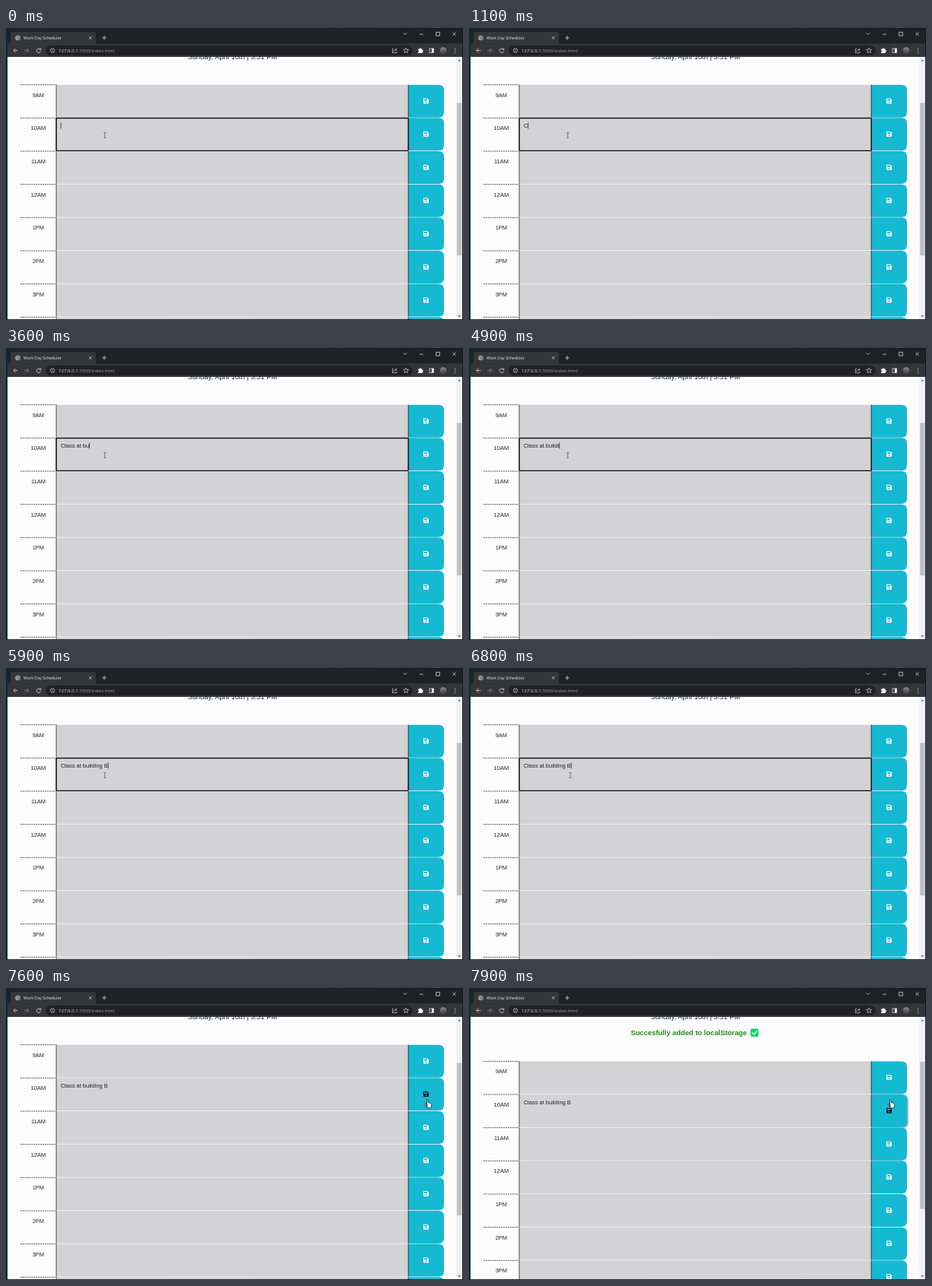
An HTML page that plays this animation: 600 by 384 pixels, repeating every 8 s.

```html
<!DOCTYPE html>
<html lang="en">
<head>
<meta charset="utf-8">
<title>Work Day Scheduler</title>
<style>
  html, body { margin: 0; width: 100%; height: 100%; overflow: hidden; background: #202124; }
  svg { display: block; width: 600px; height: 384px; }
  text { font-family: "Liberation Sans", Arial, sans-serif; font-size: 7.5px; fill: #212529; white-space: pre; }
  .ui { font-family: "Open Sans", "Noto Sans", sans-serif; }
  .line { fill: none; stroke: #d5d7da; stroke-width: .8; }
  .dim { stroke: #85888c; }
</style>
</head>
<body>
<svg viewBox="0 0 600 384">
  <defs>
    <linearGradient id="desk">
      <stop offset="0" stop-color="#0b2a3a"/><stop offset=".5" stop-color="#12202c"/><stop offset="1" stop-color="#0a1b28"/>
    </linearGradient>
    <linearGradient id="face" x2="0" y2="1">
      <stop offset="0" stop-color="#8b8790"/><stop offset="1" stop-color="#3f3c42"/>
    </linearGradient>
    <clipPath id="view"><rect x="2" y="38" width="597" height="345"/></clipPath>
    <filter id="soft" x="-20%" y="-20%" width="140%" height="140%"><feGaussianBlur stdDeviation="1"/></filter>
  </defs>

  <rect width="600" height="384" fill="url(#desk)"/>
  <rect x="2" y="1" width="597" height="20" fill="#202124"/>
  <path d="M3 21q3 0 3-3V8q0-3 3-3h106q3 0 3 3v10q0 3 3 3z" fill="#35363a"/>
  <rect x="2" y="20.5" width="597" height="17.5" fill="#35363a"/>
  <rect x="52" y="23" width="482" height="13" rx="6.5" fill="#202124"/>

  <!-- tab strip -->
  <circle cx="15.5" cy="13" r="3.3" fill="#a5a8ad"/>
  <path d="M13.4 11.4l1.6 1.2-.4 1.8M16 10.4l.6 1.4 1.4.5M16.3 15.4l.6-1.4 1.2-.2" class="line" style="stroke:#35363a"/>
  <text x="23" y="14.9" class="ui" style="font-size:5.3px;fill:#e8eaed">Work Day Scheduler</text>
  <path d="M109 11.3l3.4 3.4m0-3.4l-3.4 3.4M126.2 13h5.6M129 10.2v5.6" class="line"/>
  <path d="M521.8 6.4l2.2 2.2 2.2-2.2M543 8.2h4.6M564.7 5.6h4.6v4.6h-4.6zM586.2 5.6l4.6 4.6m0-4.6l-4.6 4.6" class="line"/>

  <!-- toolbar -->
  <path d="M15.6 29.6H9.8m2.8-2.8l-2.8 2.8 2.8 2.8" class="line"/>
  <path d="M24.2 29.6H30m-2.8-2.8l2.8 2.8-2.8 2.8" class="line dim"/>
  <path d="M45.3 28.3a2.8 2.8 0 1 0 .4 2.1M45.7 26.5v2.2h-2.2" class="line"/>
  <circle cx="61" cy="29.6" r="2.7" class="line" style="stroke-width:.7"/>
  <path d="M61 29.3v1.8M61 27.9v.7" class="line" style="stroke-width:.7"/>
  <text x="69" y="31.8" class="ui" style="font-size:6.1px;fill:#e8eaed">127.0.0.1<tspan fill="#9aa0a6">:5500/index.html</tspan></text>
  <path d="M509 27.4h-1.6v5.2h5.6v-2M509 31q.2-2.8 4-2.8m-1.5-1.6l1.7 1.6-1.7 1.6" class="line" style="stroke-width:.7"/>
  <path d="M525.2 26l1 2.3 2.5.2-1.9 1.6.6 2.5-2.2-1.3-2.2 1.3.6-2.5-1.9-1.6 2.5-.2z" class="line" style="stroke-width:.7"/>
  <path d="M541 27.5h1.8a1.1 1.1 0 0 1 2.2 0h1.7v1.8a1.1 1.1 0 0 1 0 2.2v1.6h-5.7v-1.6a1.1 1.1 0 0 0 0-2.2z" fill="#f1f3f4"/>
  <rect x="556" y="27" width="5.4" height="5.4" class="line"/>
  <rect x="558.9" y="27" width="2.5" height="5.4" fill="#f1f3f4"/>
  <circle cx="574" cy="29.6" r="4.4" fill="url(#face)"/>
  <path d="M589.6 26.9v.01M589.6 29.6v.01M589.6 32.3v.01" class="line" style="stroke-width:1.3;stroke-linecap:round"/>

  <g clip-path="url(#view)">
    <rect x="2" y="38" width="597" height="345" fill="#fefdfe"/>
    <text x="297.3" y="41" text-anchor="middle" style="font-size:9.375px">Sunday, April 10th | 5:51 PM</text>
    <g id="notice">
      <text x="212.4" y="62" style="font-size:9.375px;font-weight:bold;fill:#1f8c12">Succesfully added to localStorage</text>
      <rect x="369.6" y="53.6" width="10.4" height="10.4" rx="1.8" fill="#0bd668"/>
      <path d="M372 59l2.1 2.1 3.9-4.4" fill="none" stroke="#fff" stroke-width="1.3" stroke-linecap="round"/>
    </g>
    <g id="plan">
      <g id="rows"></g>
      <rect id="focus" x="66" y="118.5" width="462.3" height="42.8" rx="1.2" fill="none" stroke="#101010" stroke-width="1.3"/>
      <text id="entry" x="71.7" y="131"></text>
      <rect id="caret" y="124.5" width=".7" height="8" fill="#111"/>
    </g>
    <rect x="591" y="38" width="8" height="345" fill="#f1f1f1"/>
    <path d="M593.3 43.6l1.9-2 1.9 2z" fill="#555"/>
    <path d="M593.3 378l1.9 2 1.9-2z" fill="#555"/>
    <rect id="thumb" x="592" width="6.4" fill="#c1c1c1"/>
  </g>

  <path id="beam" d="M-1.5-3.4h1.1l.4.4.4-.4h1.1M0-3V3M-1.5 3.4h1.1l.4-.4.4.4h1.1" fill="none" stroke="#4a4a4a" stroke-width=".7"/>
  <path id="hand" d="M-.9.8Q-.9 0 0 0T.9.8V4Q2 3.4 2.6 4.3 3.6 3.8 4.1 4.7 5.3 4.4 5.3 5.6V7.6Q5.3 9 4.4 10.8H-.3Q-1-.0-.9 9.2L-2.9 6.6Q-3.2 5.4-2 5.5L-.9 6.4Z" fill="#fff" stroke="#111" stroke-width=".75" stroke-linejoin="round"/>
</svg>
<script>
const $ = id => document.getElementById(id);
const LOOP = 8000, TOP = 74.7, PITCH = 43.65, PHRASE = "Class at building B";
const HOURS = ["9AM", "10AM", "11AM", "12AM", "1PM", "2PM", "3PM", "4PM"];

// [time, number of letters typed]
const KEYS = [[0, 0], [1000, 1], [1600, 2], [1900, 3], [2200, 4], [2400, 5], [2600, 6],
  [2800, 7], [3300, 9], [3500, 10], [3600, 11], [3900, 12], [4200, 13], [4500, 14],
  [4900, 15], [5300, 17], [5600, 18], [5900, 19]];

// pointer place for each 100 ms after MOVE
const MOVE = 6800, CLICK = 7600, SAVED = 7900;
const PATH = [[133, 141], [205, 144], [365, 148], [510, 150], [549.7, 149.2], [552, 148.5], [553.3, 147]];

const FLOPPY = "M.8 0H5L7 2V6.2Q7 7 6.2 7H.8Q0 7 0 6.2V.8Q0 0 .8 0ZM1 1V3H5V1ZM3.5 4A1 1 0 1 0 3.5 6 1 1 0 1 0 3.5 4Z";

function buttonShape(y) {
  return `M528 ${y}h40q7 0 7 7v29q0 7-7 7h-40z`;
}

$("rows").innerHTML = HOURS.map((hour, i) => {
  const y = TOP + PITCH * i;
  return `<path d="M19 ${y}H66" stroke="#222" stroke-width=".8" stroke-dasharray="1.9 1"/>
    <text x="42.4" y="${y + 16}" text-anchor="middle">${hour}</text>
    <rect x="66" y="${y}" width="462" height="43" fill="#d3d2d4"/>
    ${i === 1 ? `<path id="glow" d="${buttonShape(y)}" transform="translate(1.3 .6)" fill="#5f8f9c" filter="url(#soft)"/>` : ""}
    <path d="${buttonShape(y)}" fill="#15b9d2"/>
    <path d="M66 ${y}v43M528.2 ${y}v43" stroke="#222" stroke-width=".8"/>
    <path id="save${i}" d="${FLOPPY}" transform="translate(548 ${y + 17.7})" fill="#fff" fill-rule="evenodd"/>`;
}).join("");

const show = (id, on) => $(id).setAttribute("visibility", on ? "visible" : "hidden");
const place = (id, x, y) => $(id).setAttribute("transform", `translate(${x} ${y})`);

function pointer(t) {
  if (t < MOVE) return [129.7, 141];
  return PATH[Math.min(PATH.length - 1, Math.floor((t - MOVE) / 100))];
}

function draw(t) {
  const saved = t >= SAVED, focused = t < CLICK;

  const typed = KEYS.filter(k => k[0] <= t).pop()[1];
  $("entry").textContent = PHRASE.slice(0, typed);
  const width = typed ? $("entry").getComputedTextLength() : 0;
  $("caret").setAttribute("x", 71.7 + width);
  show("caret", focused && !(t >= 6200 && t < MOVE));
  show("focus", focused);

  const [x, y] = pointer(t), hover = x > 528;
  place("beam", x, y);
  place("hand", x, y);
  show("beam", !hover);
  show("hand", hover);

  const fade = Math.max(0, Math.min(1, (Math.floor(t / 100) * 100 - 7100) / 270));
  const shade = Math.round(255 - 240 * fade);
  $("save1").setAttribute("fill", `rgb(${shade},${shade},${shade})`);

  place("plan", 0, saved ? 21.7 : 0);
  show("notice", saved);
  show("glow", saved);
  $("thumb").setAttribute("y", saved ? 97 : 98.5);
  $("thumb").setAttribute("height", saved ? 193.5 : 200.5);
}

function tick() {
  draw(performance.now() % LOOP);
  requestAnimationFrame(tick);
}
tick();
</script>
</body>
</html>
```
